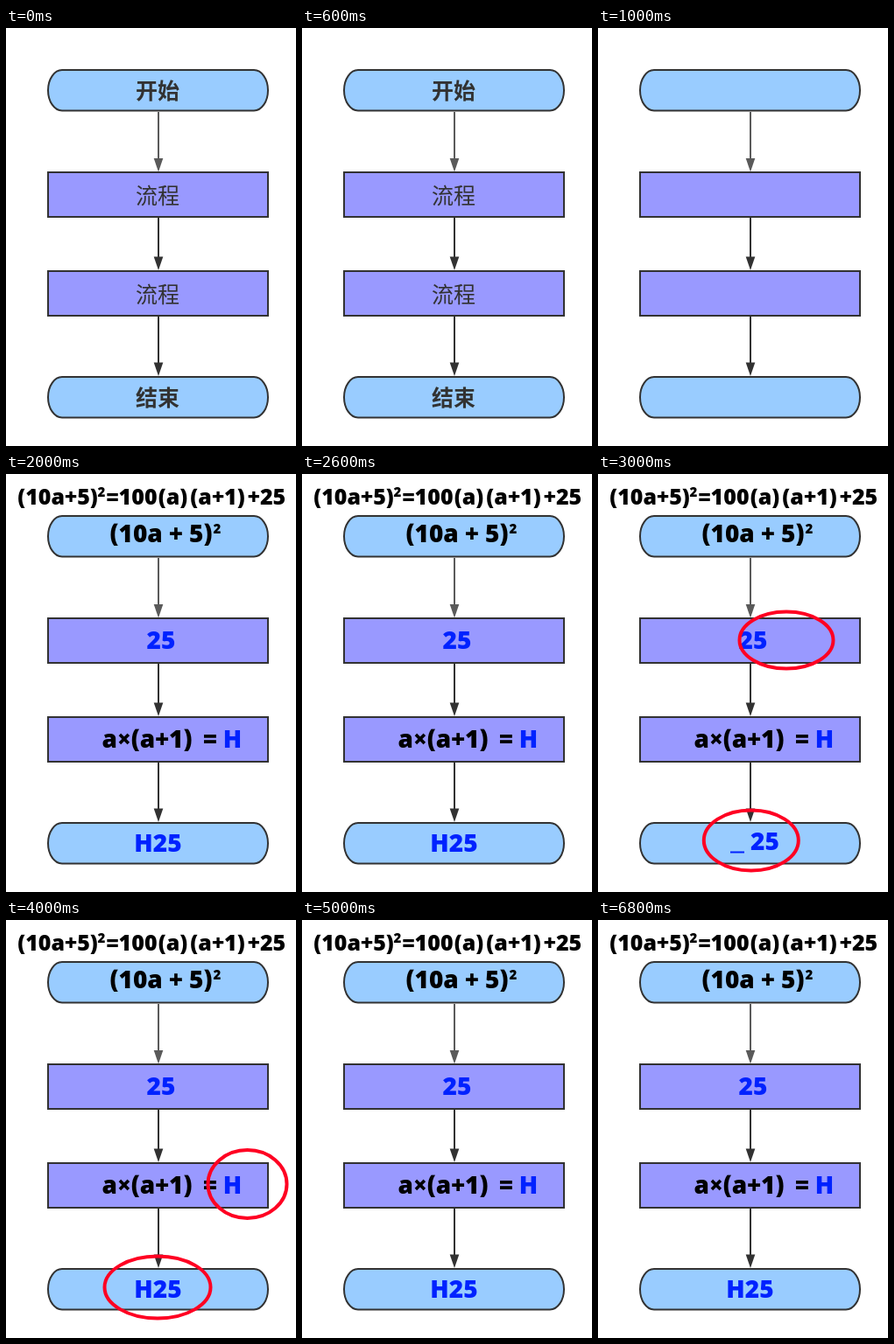
Recreate the animation shown at these times as an HTML page. Size 331 by 478 pixels, loop 8000 ms.

```html
<!DOCTYPE html>
<html lang="zh">
<head>
<meta charset="utf-8">
<title>Flowchart</title>
<style>
  html, body { margin: 0; width: 100%; height: 100%; overflow: hidden; background: #fff; }
  svg { display: block; width: 331px; height: 478px; }
  text { text-anchor: middle; }

  .box { stroke: #323232; stroke-width: 2; }
  .end { fill: #9cf; }
  .step { fill: #99f; }
  .arrow { stroke: #323232; fill: #323232; }
  .soft { stroke: #5a5a5a; fill: #5a5a5a; }
  .ring { fill: none; stroke: #ff0022; stroke-width: 4; }

  .label { font: 400 25px "Noto Sans CJK SC", "Noto Sans CJK", sans-serif; fill: #323232; }
  .bold { font-weight: 700; }
  .math { font: 800 28px "Open Sans", "Noto Sans", sans-serif; font-stretch: 80%; }
  .head { font-size: 25px; }
  .sup { font-size: 15px; }
  .blue { fill: #0022ff; }

  .scene { visibility: hidden; animation: 8s step-end infinite; }
  .names { animation-name: names; }
  .formula { animation-name: formula; }
  .result { animation-name: result; }
  .tail { animation-name: tail; }
  .high { animation-name: high; }
  @keyframes names { 0% { visibility: visible } 12.5%, 100% { visibility: hidden } }
  @keyframes formula { 0% { visibility: hidden } 25%, 100% { visibility: visible } }
  @keyframes result { 0%, 37.5% { visibility: hidden } 25%, 50%, 100% { visibility: visible } }
  @keyframes tail { 0%, 50%, 100% { visibility: hidden } 37.5% { visibility: visible } }
  @keyframes high { 0%, 62.5%, 100% { visibility: hidden } 50% { visibility: visible } }
</style>
</head>
<body>
<svg viewBox="0 0 331 478">
  <defs><path id="tip" d="M-5.3-15.5H5.3L0 0Z" stroke="none"/></defs>

  <rect class="box end" x="48" y="48" width="251" height="46.5" rx="16" ry="23.25"/>
  <rect class="box step" x="48" y="165" width="251" height="51"/>
  <rect class="box step" x="48" y="278" width="251" height="51"/>
  <rect class="box end" x="48" y="399" width="251" height="46.5" rx="16" ry="23.25"/>

  <g class="arrow soft"><path d="M174 96V152" stroke-width="2"/><use href="#tip" x="174" y="164.5"/></g>
  <g class="arrow"><path d="M174 217V265" stroke-width="2"/><use href="#tip" x="174" y="277"/></g>
  <g class="arrow"><path d="M174 330V386" stroke-width="2"/><use href="#tip" x="174" y="398"/></g>

  <g class="scene names label">
    <text class="bold" x="173" y="81">开始</text>
    <text x="173" y="200.5">流程</text>
    <text x="173" y="313.5">流程</text>
    <text class="bold" x="173" y="431.5">结束</text>
  </g>

  <g class="scene formula math">
    <g class="head">
      <text x="59" y="35">(10a+5)</text>
      <text class="sup" x="109" y="26">2</text>
      <text x="143.5" y="35">=100</text>
      <text x="190.5" y="35">(a)</text>
      <text x="241.5" y="35">(a+1)</text>
      <text x="297.5" y="35">+25</text>
    </g>
    <text x="177" y="78">(10a + 5)</text>
    <text class="sup" x="241" y="68">2</text>
    <text class="blue" x="177" y="200">25</text>
    <text x="161" y="313">a×(a+1)</text>
    <text x="233" y="313">=</text>
    <text class="blue" x="258.5" y="313">H</text>
  </g>

  <text class="scene result math blue" x="173.5" y="432">H25</text>

  <g class="scene tail">
    <path d="M151 432.5H167" stroke="#0022ff" stroke-width="2"/>
    <text class="math blue" x="190.5" y="430">25</text>
    <ellipse class="ring" cx="215" cy="190" rx="53.5" ry="32.5"/>
    <ellipse class="ring" cx="174.8" cy="419" rx="54" ry="34.5"/>
  </g>

  <g class="scene high">
    <ellipse class="ring" cx="275.5" cy="302" rx="45" ry="39"/>
    <ellipse class="ring" cx="173" cy="420" rx="60.5" ry="35.5"/>
  </g>
</svg>
</body>
</html>
```
